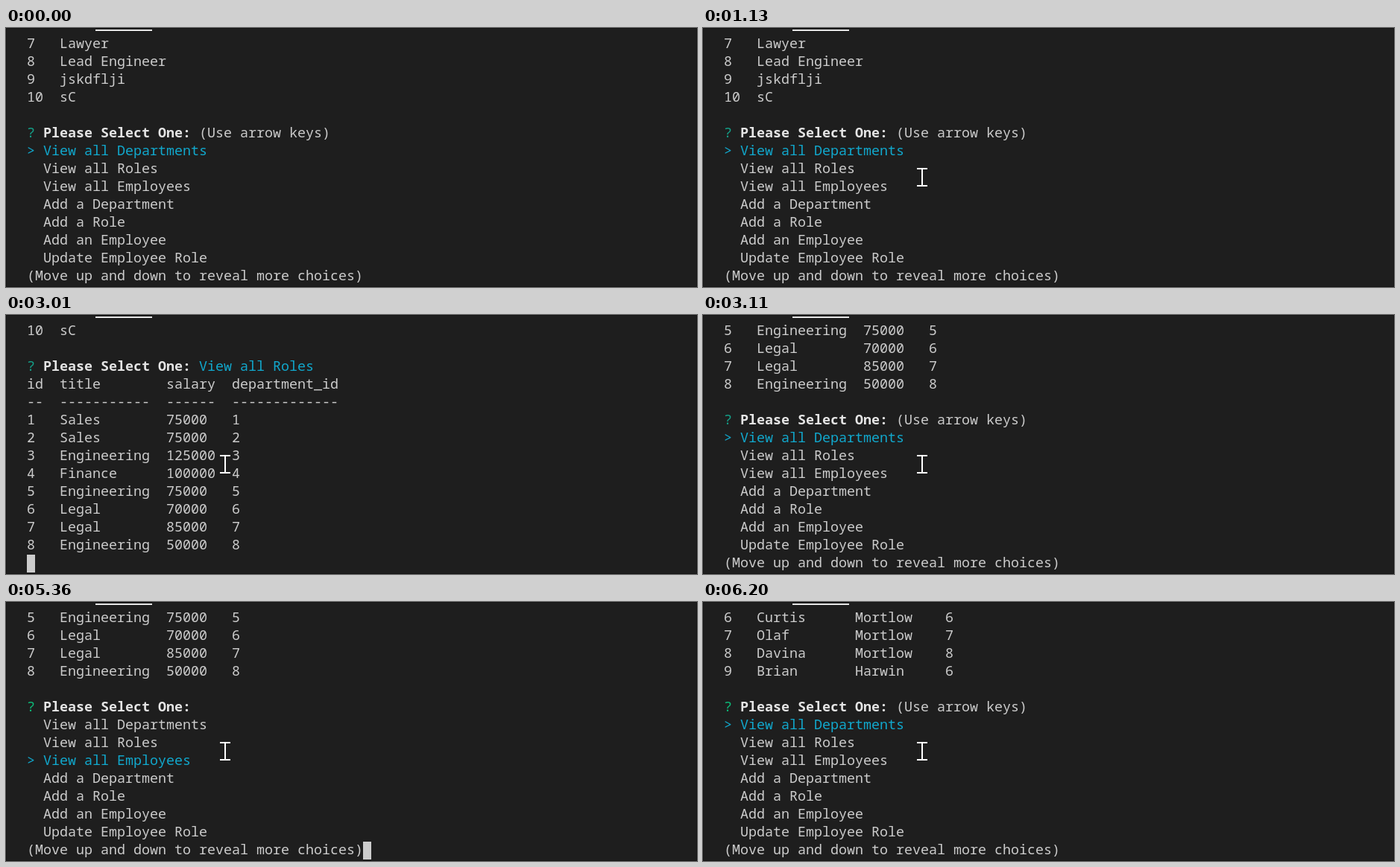
An HTML page that plays this animation: 927x348 px, repeating every 8 s.

```html
<!DOCTYPE html>
<html lang="en">
<head>
<meta charset="utf-8">
<title>Employee tracker terminal</title>
<style>
  html, body { margin: 0; width: 100%; height: 100%; overflow: hidden; background: #1e1e1e; }
  svg { display: block; width: 927px; height: 348px; }
  text { font: 18.333px "Noto Sans Mono", "DejaVu Sans Mono", monospace; fill: #ccc; white-space: pre; }
  .mark { fill: #14a28a; }
  .late .mark { fill: #0dbc79; }
  .bold { font-weight: 700; fill: #e5e5e5; }
  .pick { fill: #11a8cd; }
</style>
</head>
<body>
<svg viewBox="0 0 927 348">
  <rect width="927" height="348" fill="#1e1e1e"/>
  <rect x=".5" y=".5" width="926" height="347" fill="none" stroke="#141414"/>
  <rect x="120" y="2" width="76" height="2" fill="#e7e7e7"/>
  <g id="screen"></g>
  <rect id="caret" y="322" width="11" height="24" fill="#ccc"/>
  <path id="pointer" fill="#fff" d="M-7-13h14v2h-6v21h6v2h-14v-2h6v-21h-6z"/>
</svg>
<script>
const LOOP = 8000, LEFT = 28, CELL = 11, ROW = 24, BASE = 27;
const screen = document.getElementById('screen');
const caret = document.getElementById('caret');
const pointer = document.getElementById('pointer');

const choices = ['View all Departments', 'View all Roles', 'View all Employees',
  'Add a Department', 'Add a Role', 'Add an Employee', 'Update Employee Role'];
const more = '(Move up and down to reveal more choices)';

const span = (cls, s) => `<tspan class="${cls}">${s}</tspan>`;
const prompt = rest => span('mark', '?') + ' ' + span('bold', 'Please Select One:') + ' ' + rest;

// Column-aligned table: header, rule, rows
function table(heads, widths, rows) {
  const line = cells => cells.map((c, i) => String(c).padEnd(widths[i] + 2)).join('');
  return [heads, widths.map(w => '-'.repeat(w)), ...rows].map(line);
}

const departments = ['7   Lawyer', '8   Lead Engineer', '9   jskdflji', '10  sC'];
const roles = table(['id', 'title', 'salary', 'department_id'], [2, 11, 6, 13], [
  ['Sales', 75000], ['Sales', 75000], ['Engineering', 125000], ['Finance', 100000],
  ['Engineering', 75000], ['Legal', 70000], ['Legal', 85000], ['Engineering', 50000]
].map(([title, pay], i) => [i + 1, title, pay, i + 1]));
const staff = table(['id', 'first_name', 'last_name', 'role_id'], [2, 10, 9, 7], [
  ['Martin', 'Mortlow', 1], ['Elsa', 'Mortlow', 2], ['Peter', 'Mortlow', 3],
  ['Simon', 'Mortlow', 4], ['Clara', 'Mortlow', 5], ['Curtis', 'Mortlow', 6],
  ['Olaf', 'Mortlow', 7], ['Davina', 'Mortlow', 8], ['Brian', 'Harwin', 6]
].map((person, i) => [i + 1, ...person]));

const menu = (above, picked, hint) => [
  ...above.slice(-4), '', prompt(hint ? '(Use arrow keys)' : ''),
  ...choices.map((c, i) => i === picked ? span('pick', '&gt; ' + c) : '  ' + c),
  more
];
const result = (picked, rows, above) => [...above, prompt(span('pick', choices[picked])), ...rows];

// Start time, lines, caret column (-1 hides it)
const end = more.length;
const scenes = [
  [0, menu(departments, 0, true), -1],
  [2190, menu(departments, 1), end],
  [3010, result(1, roles, [departments[3], '']), 0],
  [3060, menu(roles, 0, true), end],
  [3110, menu(roles, 0, true), -1],
  [5130, menu(roles, 1), end],
  [5310, menu(roles, 2), -1],
  [5360, menu(roles, 2), end],
  [6170, result(2, staff, ['']), 0],
  [6200, menu(staff, 0, true), -1]
];

function show([start, lines, col]) {
  screen.innerHTML = lines.map((s, i) =>
    `<text x="${LEFT}" y="${BASE + i * ROW}" xml:space="preserve">${s}</text>`).join('');
  screen.classList.toggle('late', start >= 5310);
  caret.setAttribute('visibility', col < 0 ? 'hidden' : 'visible');
  caret.setAttribute('x', LEFT + Math.max(col, 0) * CELL);
}

const smooth = p => p * p * (3 - 2 * p);
const mix = (a, b, p) => a + (b - a) * p;

// Sweeps in from the lower right, overshoots, then settles
function movePointer(t) {
  pointer.setAttribute('visibility', t < 290 ? 'hidden' : 'visible');
  const p = Math.min(Math.max(Math.floor((t - 290) / 49.4 + 0.02) / 17, 0), 1);
  const turn = 12 / 17;
  const [x, y] = p < turn
    ? [mix(694, 278, smooth(p / turn)), mix(320, 194, smooth(p / turn))]
    : [mix(278, 294, smooth((p - turn) / (1 - turn))), mix(194, 201, smooth((p - turn) / (1 - turn)))];
  pointer.setAttribute('transform', `translate(${Math.round(x)} ${Math.round(y)})`);
}

let current;
function draw() {
  const t = performance.now() % LOOP;
  const scene = scenes.findLast(s => s[0] <= t);
  if (scene !== current) show(current = scene);
  movePointer(t);
  requestAnimationFrame(draw);
}
draw();
</script>
</body>
</html>
```
